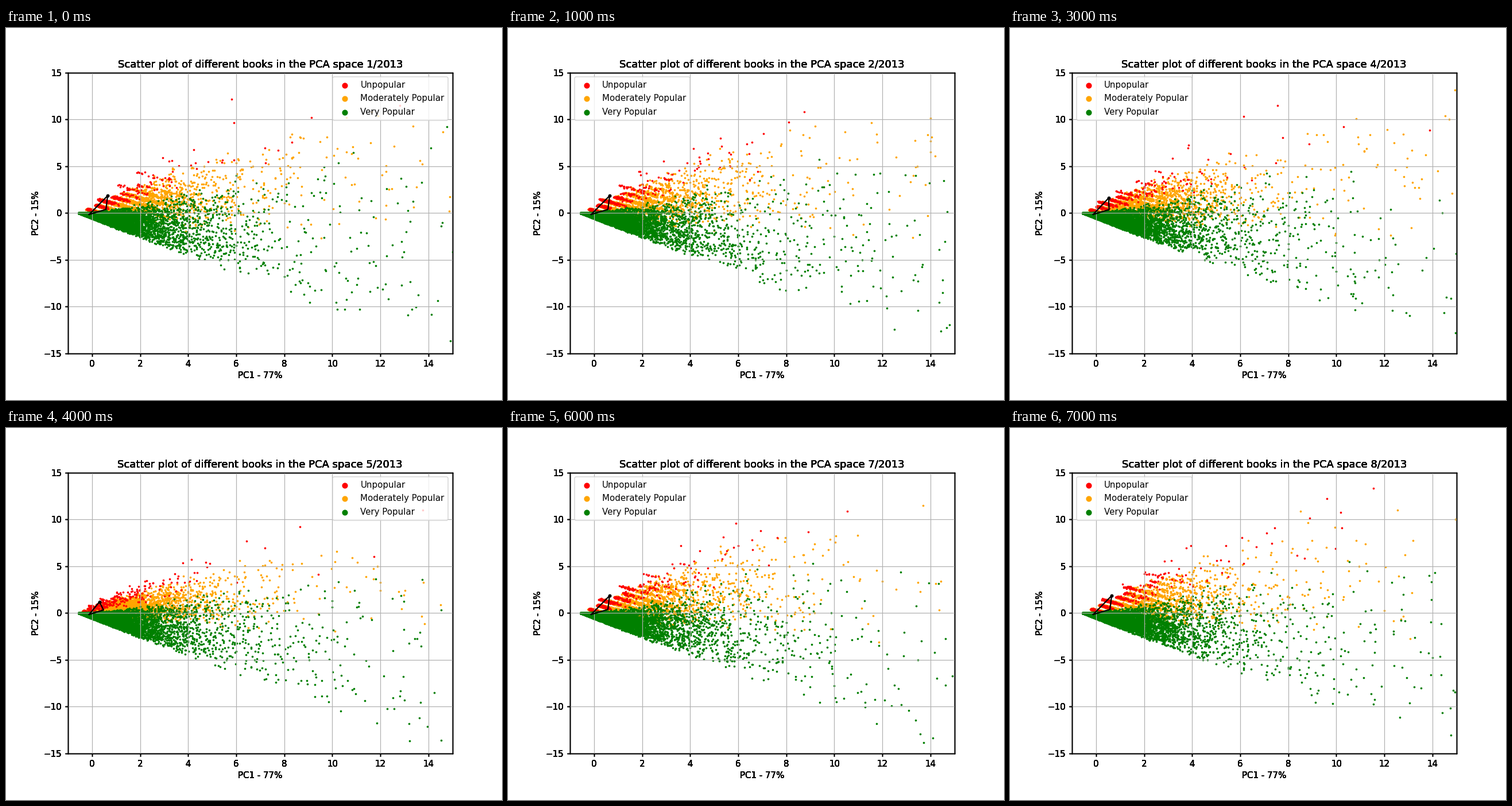
These frames come from a looping animation (864x648 px, 8000 ms). A matplotlib script:

```python
import matplotlib.pyplot as plt
import numpy as np
from matplotlib.animation import FuncAnimation

MONTHS = 8
LAYERS = 8            # stacked axes give the heavy text and frame
APEX = -0.55          # x of the tip of the cloud
RED, ORANGE, GREEN = "red", "orange", "green"
LABELS = {RED: "Unpopular", ORANGE: "Moderately Popular", GREEN: "Very Popular"}
LEGEND_RIGHT = {0, 4, 5}


def dip(m):
    """The cloud flattens around the fifth month."""
    return np.exp(-(m - 4.0) ** 2)


def centers(m):
    """Class centroids joined by the black triangle."""
    d = dip(m)
    return {GREEN: (-0.12, -0.15),
            RED: (0.65 - 0.34 * d, 1.85 - 0.65 * d),
            ORANGE: (0.58 - 0.1 * d, 0.39 - 0.06 * d)}


def reach(rng, count, power):
    """Heavy-tailed distances from the apex, cut at the right edge."""
    r = 2 * rng.pareto(power, int(count))
    return r[r < 15.6]


def streaks(rng, r, slope, step):
    """Pull points onto parallel falling rows whose tips are evenly spaced."""
    gap = 0.84 * step
    fall = 0.68
    row = np.round((slope + fall) * r / gap)
    y = row * gap - fall * r + rng.normal(0, 0.02 + 0.035 * r)
    limit = np.where(row % 3 == 0, 1.95, 1.25)
    keep = (y < limit * r) & (y > -0.5 * r) & (y < 13.8)
    return r[keep], y[keep]


def make_month(m):
    rng = np.random.default_rng(2013 + m)
    step = 0.8 - 0.38 * dip(m)
    lift = 1 - 0.28 * dip(m)

    r = reach(rng, 1400 * lift ** 2, 3.3)
    slope = 0.55 + 1.35 * rng.beta(1.4, 1.9, r.size)
    slope *= lift + (1 - lift) * np.exp(-r / 2)
    red = streaks(rng, r, slope, step)

    r = reach(rng, 11500, 3)
    slope = -0.33 + 1.55 * rng.beta(2.3, 3, r.size)
    slope *= lift * (1 + 0.3 * np.exp(-r / 3))
    orange = streaks(rng, r, slope, step)

    r = reach(rng, 11500, 2.55)
    far = np.minimum(r / 5, 1)
    low, width = 0.1 * far - 1.1, 1.3 + 0.35 * far
    y = r * (low + width * rng.beta(1.6, 2.4, r.size))
    y[y > 0] *= lift
    keep = y > -14.5
    green = r[keep], y[keep]

    clouds = {ORANGE: orange, RED: red, GREEN: green}
    return {c: np.column_stack([r + APEX, y]) for c, (r, y) in clouds.items()}


months = [make_month(m) for m in range(MONTHS)]

fig = plt.figure(figsize=(8, 6), dpi=108, facecolor="white")
layers = []
for k in range(LAYERS):
    ax = fig.add_axes([0.125, 0.125, 0.775, 0.755], label=f"layer{k}")
    ax.set(xlim=(-1, 15), ylim=(-15, 15),
           xlabel="PC1 - 77%", ylabel="PC2 - 15%")
    ax.patch.set_visible(k == 0)
    layers.append(ax)

top = layers[-1]
top.grid(True)
dots = {c: top.scatter([], [], s=2, color=c) for c in (ORANGE, RED, GREEN)}
keys = [top.scatter([], [], s=33, color=c) for c in LABELS]
triangle, = top.plot([], [], color="black", lw=1.5)
tip, = top.plot([], [], "o", color="black", ms=3)


def update(m):
    for ax in layers:
        ax.set_title(f"Scatter plot of different books in the PCA space {m + 1}/2013")
    for color, cloud in months[m].items():
        dots[color].set_offsets(cloud)
    mid = centers(m)
    corners = [mid[c] for c in (GREEN, RED, ORANGE, GREEN)]
    triangle.set_data(*zip(*corners))
    tip.set_data(*zip(mid[RED]))
    side = "upper right" if m in LEGEND_RIGHT else "upper left"
    top.legend(keys, LABELS.values(), loc=side,
               labelspacing=0.58, borderpad=0.43)
    return []


anim = FuncAnimation(fig, update, frames=MONTHS, interval=1000,
                     init_func=lambda: [], repeat=True)
plt.show()
```
